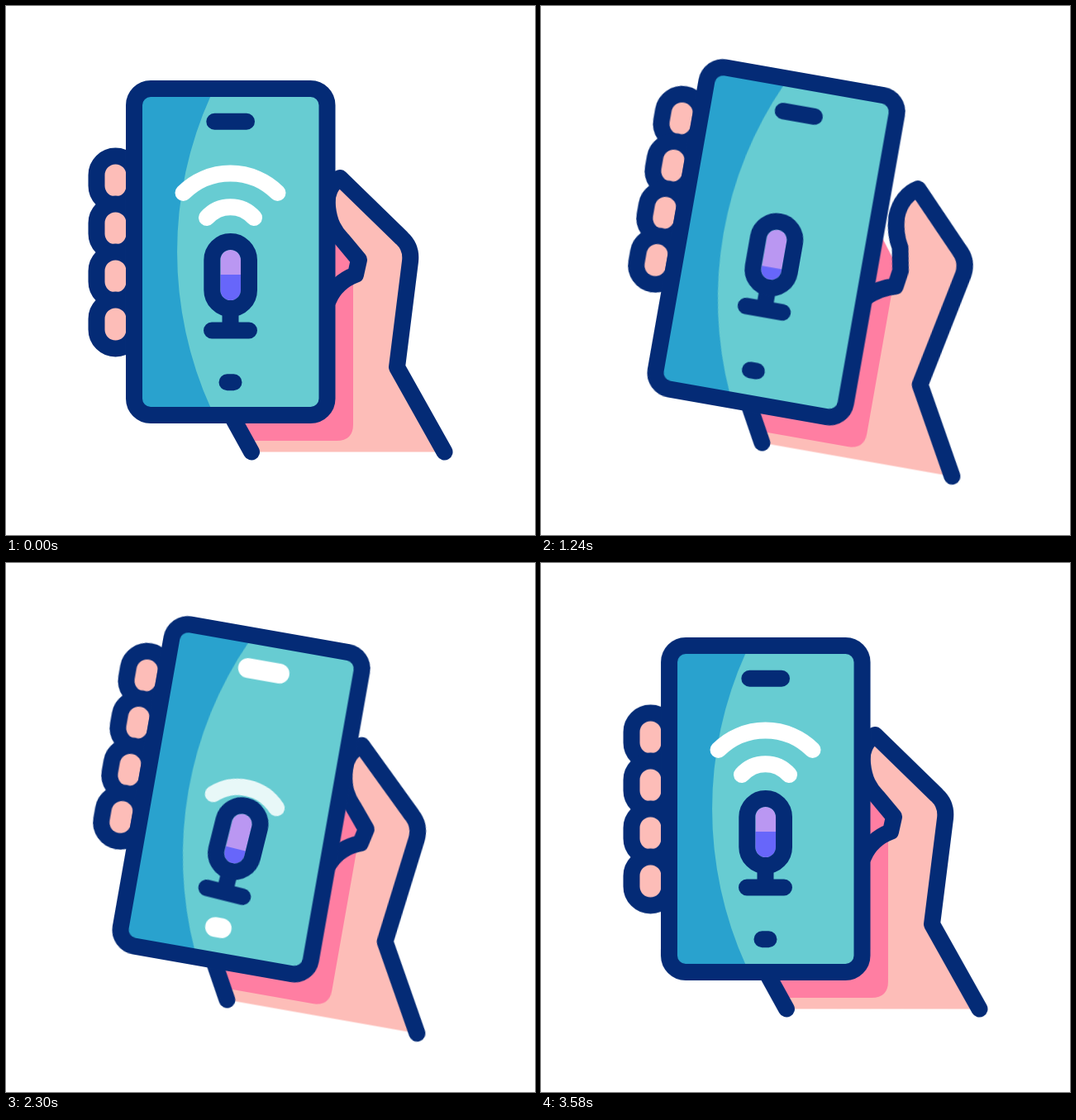
Recreate the animation shown at these times as an HTML page. Size 640 px wide and 640 px high, loop 3.6 s.

```html
<!DOCTYPE html>
<html lang="en">
<head>
<meta charset="utf-8">
<title>Voice assistant phone</title>
<style>
  html, body { margin: 0; width: 100%; height: 100%; overflow: hidden; background: #fff; }
  svg { display: block; width: 100vw; height: 100vh; }

  :root {
    --navy: #042b76;
    --skin: #fdbdb8;
    --rest: path("M530.5 539.5L473 437L489 309Q491 292 479 281L404 208C393 215 387 228 389 243C391 262 397 273 407 283L427 307L423 325C407 331 396 342 390 356L268 487L297 539.5");
  }

  .line { fill: none; stroke: var(--navy); stroke-width: 20; stroke-linecap: round; stroke-linejoin: round; }
  .skin { fill: var(--skin); }
  .lit { stroke: #fff; stroke-width: 24; }

  .anim { animation: 3600ms cubic-bezier(.35, 0, .65, 1) infinite; }
  .tilt { transform-origin: 345px 365px; animation-name: tilt; }
  .fingers { animation-name: fingers; }
  .hand { d: var(--rest); animation-name: thumb; }
  .mic { animation-name: mic; }
  .rock { transform-origin: 271.5px 392px; animation-name: rock; }
  .level { animation-name: level; }
  .glow { animation-name: glow; }
  .waves { animation-name: waves; }
  .sway { transform-origin: 271.5px 396px; animation-name: sway; }
  .arc {
    stroke: #fff; vector-effect: non-scaling-stroke;
    transform-origin: 271.5px 325px; animation-timing-function: linear;
  }
  .big { animation-name: big; }
  .small { animation-name: small; }

  @keyframes tilt {
    0%, 100% { transform: rotate(0deg); }
    12.22%, 15.56% { transform: rotate(-16.05deg); }
    30.56%, 78.89% { transform: rotate(10deg); }
  }
  @keyframes fingers {
    0%, 100% { transform: translateY(0); }
    12.22%, 15.56% { transform: translateY(36.5px); }
    30.56%, 78.89% { transform: translateY(-41px); }
  }
  @keyframes thumb {
    0%, 30.56%, 45%, 100% {
      d: path("M530.5 539.5L473 437L489 309Q491 292 479 281L404 208C393 215 387 228 389 243C391 262 397 273 407 283L427 307L423 325C407 331 396 342 390 356L268 487L297 539.5");
    }
    37.78% {
      d: path("M530.5 539.5L473 437L511 287Q513.5 270 501.5 259L449 201C438 207 428 222 426 241C426 254 428 264 431 274L425 304L423 325C410 327 400 331 388 337L268 487L297 539.5");
    }
  }
  @keyframes mic {
    0%, 100% { transform: translateY(0); }
    12.22%, 15.56% { transform: translateY(21px); }
    30.56%, 35.5% { transform: translateY(-12.7px); }
    49% { transform: translateY(19px); }
    78.89% { transform: translateY(19.7px); }
  }
  @keyframes rock {
    0%, 52.78%, 75%, 100% { transform: rotate(0deg); }
    58.33%, 69.44% { transform: rotate(-4deg); }
    63.89% { transform: rotate(4deg); }
  }
  @keyframes sway {
    0%, 52.78%, 75%, 100% { transform: rotate(0deg); }
    58.33%, 69.44% { transform: rotate(-2.5deg); }
    63.89% { transform: rotate(2.5deg); }
  }
  @keyframes level {
    0%, 100% { transform: translateY(30px); }
    12.22%, 15.56%, 50% { transform: translateY(13.5px); }
    30.56%, 69.44%, 78.89% { transform: translateY(50px); }
  }
  @keyframes glow {
    0%, 44.44%, 79.5%, 100% { opacity: 0; }
    46.67%, 76% { opacity: 1; }
  }
  @keyframes waves {
    0%, 16.7%, 100% { transform: translateY(0); }
    30%, 78.89% { transform: translateY(15px); }
  }
  @keyframes big {
    0%, 100% { transform: none; opacity: 1; }
    8.33% { transform: translateY(0) scale(1.04); opacity: 1; }
    11.67% { transform: translateY(0) scale(1.05); opacity: .67; }
    16.67% { transform: translateY(0) scale(1.06); opacity: 0; }
    35.28% { transform: translateY(30px) scale(.57); opacity: 0; }
    38.9% { transform: translateY(27px) scale(.687); opacity: .85; }
    45% { transform: translateY(0) scale(1); opacity: 1; }
    47.5% { transform: translateY(0) scale(1.03); opacity: .9; }
    50.56% { transform: translateY(0) scale(1.05); opacity: .33; }
    52.5% { transform: translateY(0) scale(1.06); opacity: 0; }
    60.28% { transform: translateY(30px) scale(.57); opacity: 0; }
    63.89% { transform: translateY(27px) scale(.687); opacity: .85; }
    70% { transform: translateY(0) scale(1); opacity: 1; }
    72.5% { transform: translateY(0) scale(1.03); opacity: .9; }
    77.5% { transform: translateY(0) scale(1.06); opacity: 0; }
    84.8% { transform: translateY(12px) scale(.54); opacity: 0; }
    87.22% { transform: translateY(10px) scale(.574); opacity: .35; }
    90% { transform: translateY(7px) scale(.68); opacity: .85; }
    98% { transform: translateY(0) scale(1); opacity: 1; }
  }
  @keyframes small {
    0%, 100% { transform: none; opacity: 1; }
    8.33% { transform: translateY(0) scale(1.05); opacity: 1; }
    11.67% { transform: translateY(0) scale(1.07); opacity: .67; }
    16.67% { transform: translateY(0) scale(1.08); opacity: 0; }
    40.5% { transform: translateY(18px) scale(.85); opacity: 0; }
    45% { transform: translateY(0) scale(1); opacity: 1; }
    47.5% { transform: translateY(0) scale(1.04); opacity: .9; }
    50.56% { transform: translateY(0) scale(1.07); opacity: .33; }
    52.5% { transform: translateY(0) scale(1.08); opacity: 0; }
    65.5% { transform: translateY(18px) scale(.85); opacity: 0; }
    70% { transform: translateY(0) scale(1); opacity: 1; }
    72.5% { transform: translateY(0) scale(1.04); opacity: .9; }
    77.5% { transform: translateY(0) scale(1.08); opacity: 0; }
    90.5% { transform: translateY(12px) scale(.85); opacity: 0; }
    98% { transform: translateY(0) scale(1); opacity: 1; }
  }
</style>
</head>
<body>
<svg viewBox="0 0 640 640">
  <defs>
    <clipPath id="pill"><rect x="259.5" y="295" width="24.5" height="61" rx="12.25"/></clipPath>
    <rect id="finger" x="109.5" width="46" height="59" rx="23"/>
  </defs>
  <g class="anim tilt">
    <path class="anim hand skin"/>
    <path fill="#ff7ea2" d="M388 258L420 300V506Q420 526 400 526H289L268 487Z"/>
    <path class="anim hand line"/>

    <g class="anim fingers">
      <g class="line" style="fill: var(--skin)">
        <use href="#finger" y="181.5"/>
        <use href="#finger" y="239.5"/>
        <use href="#finger" y="297.5"/>
        <use href="#finger" y="355.5"/>
      </g>
    </g>

    <rect x="155" y="100" width="233.5" height="395" rx="20" fill="#67ccd2"/>
    <path fill="#29a2ce" d="M248 108A459 459 0 0 0 248 487H160V108Z"/>
    <rect class="line" x="155" y="100" width="233.5" height="395" rx="20"/>

    <path class="line" d="M252.3 139.8H291M267.5 455.3H275.5"/>
    <path class="anim glow line lit" d="M252.3 139.8H291M267.5 455.3H275.5"/>

    <g class="anim waves">
      <g class="anim sway">
        <path class="line anim arc big" d="M214.5 226A81 81 0 0 1 328.5 226"/>
        <path class="line anim arc small" d="M243 256A38 38 0 0 1 300 256"/>
      </g>
    </g>

    <g class="anim mic">
      <g class="anim rock">
        <path class="line" d="M271.5 366V392M249 392.5H294"/>
        <g clip-path="url(#pill)">
          <rect x="255" y="290" width="34" height="70" fill="#ba97f2"/>
          <rect class="anim level" x="255" y="295" width="34" height="70" fill="#6766fa"/>
        </g>
        <rect class="line" x="249.3" y="285" width="44.7" height="81" rx="22.35"/>
      </g>
    </g>
  </g>
</svg>
</body>
</html>
```
